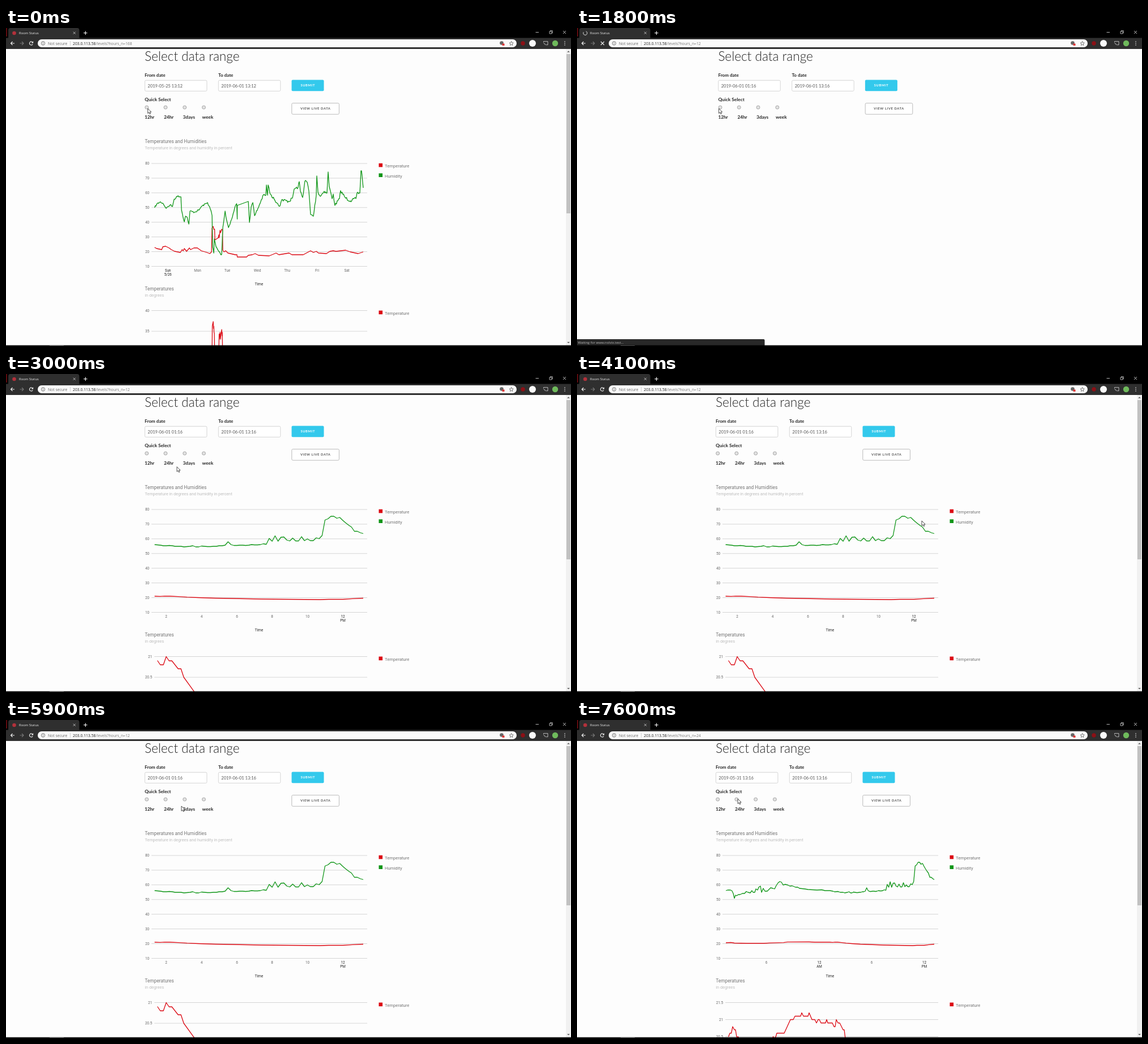
Animation of 998x561 px, one loop 8000 ms. Source, as an HTML page with a canvas:

```html
<!DOCTYPE html>
<html lang="en">
<head>
<meta charset="utf-8">
<title>Room Status</title>
<style>
html, body { margin: 0; width: 100%; height: 100%; overflow: hidden; background: #fdfdfd; }
canvas { display: block; }
</style>
</head>
<body>
<canvas id="stage" width="998" height="561"></canvas>
<script>
const ctx = document.getElementById('stage').getContext('2d');
const LOOP = 8000, RED = '#dc0a14', GREEN = '#109618';
const HOST = '203.0.113.58', PATH = '/levels?hours_n=';
const UI = '"Open Sans", sans-serif', FORM = 'Lato, sans-serif', CHART = 'Roboto, sans-serif';

// ---- drawing helpers ----
function text(str, x, y, size, color, family = CHART, weight = 400, align = 'left', spacing = 0) {
  ctx.font = `${weight} ${size}px ${family}`;
  ctx.fillStyle = color;
  ctx.textAlign = align;
  ctx.letterSpacing = spacing + 'px';
  ctx.fillText(str, x, y);
}
function rect(x, y, w, h, color) {
  ctx.fillStyle = color;
  ctx.fillRect(x, y, w, h);
}
function box(x, y, w, h, r, fill, border) {
  ctx.beginPath();
  ctx.roundRect(x, y, w, h, r);
  if (fill) { ctx.fillStyle = fill; ctx.fill(); }
  if (border) { ctx.strokeStyle = border; ctx.lineWidth = 0.8; ctx.stroke(); }
}
function disc(x, y, r, fill) {
  ctx.beginPath();
  ctx.arc(x, y, r, 0, 7);
  ctx.fillStyle = fill;
  ctx.fill();
}
function arc(x, y, r, from, to, color, width = 1) {
  ctx.beginPath();
  ctx.arc(x, y, r, from, to);
  ctx.strokeStyle = color;
  ctx.lineWidth = width;
  ctx.stroke();
}
function path(d, color, width = 1, fill) {
  const p = new Path2D(d);
  if (fill) { ctx.fillStyle = fill; ctx.fill(p); }
  ctx.strokeStyle = color;
  ctx.lineWidth = width;
  ctx.stroke(p);
}
function polyline(points, color) {
  ctx.beginPath();
  points.forEach(([x, y]) => ctx.lineTo(x, y));
  ctx.strokeStyle = color;
  ctx.lineWidth = 1.3;
  ctx.lineJoin = 'round';
  ctx.stroke();
}

// ---- chart data, in stage coordinates ----
const pairs = str => str.split(' ').map(p => p.split(',').map(Number));
function roughen(points, amount) {
  let seed = 7;
  const random = () => (seed = seed * 16807 % 2147483647) / 2147483647 - 0.5;
  return points.flatMap(([x, y], i) => {
    if (!i) return [[x, y]];
    const [px, py] = points[i - 1], n = Math.max(1, Math.round((x - px) / 1.3)), out = [];
    for (let k = 1; k < n; k++) out.push([px + (x - px) * k / n, py + (y - py) * k / n + random() * amount]);
    return [...out, [x, y]];
  });
}
const lastHalf = points => points.map(([x, y]) => [446.8 + (x - 262.5) / 2, y]);

const humidity12 = [301, 301.5, 302, 303, 303, 302.5, 303, 304, 304, 304, 305, 304.5, 304, 303, 305, 305, 303.5, 304,
  304.5, 304.5, 304, 304, 303, 303, 302, 296, 301, 302.5, 302.5, 302, 302, 302.5, 302, 301, 301.5, 301.5, 301, 299.5,
  300.5, 290, 295, 285.5, 295, 288, 287.5, 293, 294.5, 289.5, 294.5, 294.5, 287, 294, 291, 294, 294, 289, 290.5, 285,
  257.5, 255.5, 251, 251, 254.5, 253, 258, 262.5, 266.5, 270, 277.5, 277.5, 280, 281.5
].map((y, i) => [262.5 + i * 5.19, y]);
const temperature12 = pairs('262.5,392 272,392.4 280,391.9 290,392 304,392.7 320,393.7 340,394.5 370,395.5 400,396 450,397 500,397.5 555,398 570,397.5 595,397.5 612,396.3 631,395.5');

const charts = {
  168: {
    days: [[286, 'Sun', '5/26'], [338.5, 'Mon'], [391, 'Tue'], [444, 'Wed'], [496.5, 'Thu'], [549.5, 'Fri'], [602, 'Sat']],
    humidity: roughen(pairs('262.5,317 266,311 272,307 277,309 283,318 290,312 294,315 297,302 304,296 309,298 310,321 315,342 317,332 320,334 323,346 325,323 333,325 341,321 345,315 356,308 362,322 364,331 365,386 367,397 368,372 371,386 376,394 379,399 381,399 383,352 387,323 389,336 393,352 400,333 405,314 407.5,310 408.5,337'), 3)
      .concat([[408.5, 313], [425, 307]],
        roughen(pairs('428,306 430,343 433,316 436,308 439,331 445,318 451,303 455,294 459,295 460,277 462,295 463,277 466,291 475,304 484,314 487,303 500,306 506,300 509,284 516,281 518,271 520,288 524,299 528,270 532,272 535,288 538,329 543,332 548,295 549,261 551,289 555,297 562,288 567,291 569,254 571,280 576,301 578,293 581,313 589,301 591,287 599,299 608,305 618,301 620,291 625,291 627,252 628,252 630,272 631,282'), 5)),
    temperature: pairs('262.5,387 266,389 275,391 277,386 282,385 288,388 292,391 298,394 308,396 311,391 313,393 315,389 319,394 324,388 326,391 332,388 338,388 345,393 355,396 360,398 363,395 364,353 366,350 367,355 368.5,355 369,374 375,370 376,365 376.5,370 377.5,362 378,357 379,361 381,355 382.5,357 383,392 385,395 388,393 392,397 405,400 408,400 408.5,404 425,404 428,401 435,400 440,398 446,401 465,402 477,397 482,400 500,397 505,400 525,400 538,393 543,396 548,394 552,397 566,398 572,394 578,393 583,394 600,392 608,395 622,398 631,395'),
    labels: ['40', '35'], step: 36.4, labelX: 253,
    detail: [pairs('364,565 364.5,525 366,518 366.5,530 367,526 367.5,537 368,539 368.5,565'),
      pairs('376,565 376.5,540 377,549 378,537 379,549 379.5,541 381,532 381.5,543 382,537 382.5,565')]
  },
  12: {
    days: [[283, '2'], [345.5, '4'], [408, '6'], [470, '8'], [532.5, '10'], [595, '12', 'PM']],
    humidity: humidity12,
    temperature: temperature12,
    labels: ['21', '20.5'], step: 36.4, labelX: 258,
    detail: [pairs('267.5,505.5 272.5,513 278,513 283,498.5 288,506 293,506 304,520 309,520 314,535 335,564')]
  },
  24: {
    days: [[334.5, '6'], [428, '12', 'AM'], [520.5, '6'], [613.5, '12', 'PM']],
    humidity: pairs('263,301 266,300 271,300 273.5,301 276,306 278,314.5 280,309 282,310 285,308 288,308 292,306 296,306 299,302.5 302,304 306,305 309,301 311,304 314,304 316,298 319,300 321,295 324,293 326,304 329,297 332,302 336,302 339,299 342,296 346,297 349,298 352,292 355,287.5 358,285 361,286 364,291 368,290 372,291 376,293 380,292.5 386,295 390,295 393,297 402,298 408,299 424,300 432,299.5 438,301').concat(lastHalf(humidity12)),
    temperature: pairs('263,393 272,392.5 278,393.5 300,394 330,394 340,393.3 365,392.7 372,391.7 410,391.5 420,392').concat(lastHalf(temperature12)),
    labels: ['21.5', '21', '20.5'], step: 30, labelX: 258,
    detail: [pairs('267.5,559 270,552.5 272.5,552.5 275,541 278,546.5 280,546.5 282,559 285,559 287,566'),
      pairs('345,565 346.5,558.5 348,562 351,559 353,552.5 366,552.5 377,528.5 382,528.5 385,522.5 395,522.5 397,516.5 400,522.5 408,522.5 410,516.5 415,528.5 420,528.5 423,534.5 426,528.5 428,528.5 431,534.5 439,534.5 441,528.5 443,534.5 451,534.5 454,541 456,541 458,528.5 461,534.5 464,534.5 470,546.5 472,546.5 474,562')]
  }
};
const fromDates = { 168: '2019-05-25 13:12', 12: '2019-06-01 01:16', 24: '2019-05-31 13:16' };

// ---- page ----
function drawForm(dx, range, checked) {
  ctx.save();
  ctx.translate(dx, 0);
  const ink = '#222';
  text('Select data range', 245, 58, 22.6, ink, FORM, 300);
  [['From date', 245, fromDates[range]], ['To date', 375, range === 168 ? '2019-06-01 13:12' : '2019-06-01 13:16']]
    .forEach(([label, x, value]) => {
      text(label, x, 86, 8.1, ink, FORM, 700);
      box(x + 0.3, 92.3, 109.5, 19, 2, '#fff', '#ccc');
      text(value, x + 5.3, 104.6, 7.5, '#555', FORM);
    });
  text('Quick Select', 245, 128.6, 8.3, ink, FORM, 700);
  [['12hr', 245, 248.6], ['24hr', 279, 281.8], ['3days', 312.5, 315.6], ['week', 346.5, 349.4]].forEach(([label, x, cx], i) => {
    disc(cx, 140, 3, '#e2e2e2');
    arc(cx, 140, 3, 0, 7, '#999', 0.8);
    if (checked === i) disc(cx, 140, 1.6, '#444');
    text(label, x, 160, 8.2, ink, FORM, 700);
  });
  box(504.5, 91.6, 57, 19.6, 2, '#33c9ec');
  text('SUBMIT', 533.2, 103.4, 5.8, '#fff', FORM, 700, 'center', 0.6);
  box(504.8, 132.6, 83.6, 19.6, 2, '#fff', '#aaa');
  text('VIEW LIVE DATA', 546.7, 144.4, 5.8, '#555', FORM, 700, 'center', 0.6);
  ctx.restore();
}

function legend(label, y, color) {
  rect(658.5, y, 6.6, 6.6, color);
  text(label, 669, y + 7.4, 7.7, '#757575');
}

function gridRow(label, x, y) {
  rect(x + 4, y - 0.4, 638 - x - 4, 0.8, '#ccc');
  text(label, x, y + 2.3, 6.3, '#666', CHART, 400, 'right');
}

function drawCharts(chart) {
  text('Temperatures and Humidities', 245.3, 203, 8.3, '#757575');
  text('Temperature in degrees and humidity in percent', 245.3, 214, 7.3, '#bdbdbd');
  for (let i = 0; i < 8; i++) gridRow(80 - i * 10, 253, 239 + i * 25.93);
  chart.days.forEach(([x, ...lines]) => lines.forEach((line, i) =>
    text(line, x, 430 + i * 7, 6.3, lines.length > 1 ? '#222' : '#666', CHART, 400, 'center')));
  text('Time', 446.8, 453.6, 6.5, '#222', CHART, 400, 'center');
  polyline(chart.temperature, RED);
  polyline(chart.humidity, GREEN);
  legend('Temperature', 238.7, RED);
  legend('Humidity', 256.4, GREEN);

  text('Temperatures', 245.3, 463, 8.3, '#757575');
  text('in degrees', 245.3, 474, 7.3, '#bdbdbd');
  chart.labels.forEach((label, i) => gridRow(label, chart.labelX, 498.6 + i * chart.step));
  chart.detail.forEach(points => polyline(points, RED));
  legend('Temperature', 498.5, RED);
}

function drawScrollbar() {
  rect(989, 37, 9, 523, '#f1f1f1');
  rect(990, 46, 7, 281, '#c1c1c1');
  path('M991.5 42.5l2-2 2 2z', '#555', 0.3, '#555');
  path('M991.5 554l2 2 2-2z', '#555', 0.3, '#555');
}

// ---- browser frame ----
function drawBrowser(t, range, loading, waiting) {
  rect(0, 0, 998, 18, '#000');
  rect(0, 0, 2, 15, '#5c0a0e');
  box(4, 0, 125.5, 20, [4, 4, 0, 0], '#2f2f2f');
  rect(0, 17.5, 998, 19.5, '#2f2f2f');
  if (loading) {
    const start = waiting ? -1.8 + (t - 7000) / 160 : -1.2 + (t - 1800) / 130;
    arc(14.5, 9, 3.5, start, start + (waiting ? 0.9 : 4.9), '#ddd');
  } else disc(14.5, 9, 3.3, '#b3313b');
  text(waiting ? HOST + PATH + range : 'Room Status', 23, 11, 5.9, '#eee', UI);
  path('M118.7 6.7l4 4m0-4l-4 4', '#ccc', 0.9);
  path('M137 8.7h6.6m-3.3-3.3v6.6', '#fff', 1.1);
  path('M935.5 7.7h5.5M984 5l5 5m0-5l-5 5', '#eee', 0.8);
  path('M960 6h4v4h-4zM961.3 6v-1.3h4v4h-1.3', '#eee', 0.7);

  path('M15 27H8.5m3-3l-3 3 3 3', '#eee', 1.1);
  path('M24.5 27H31m-3-3l3 3-3 3', '#777', 1.1);
  if (loading) path('M42 24l6 6m0-6l-6 6', '#eee', 1.1);
  else {
    arc(44.6, 27, 3, 0.5, 5.5, '#eee', 1.1);
    path('M48 23.6v3h-3z', '#eee', 0.3, '#eee');
  }
  box(56, 20, 846, 14, 7, '#fafafa');
  arc(65.5, 27, 3.2, 0, 7, '#555', 0.8);
  path('M65.5 26.4v2.3m0-3.9v.9', '#555', 0.8);
  text('Not secure', 74, 29.5, 6.8, '#666', UI);
  rect(113, 23, 0.6, 8, '#bbb');
  text(HOST, 118, 29.5, 6.8, '#222', UI);
  const hostWidth = ctx.measureText(HOST).width;
  text(PATH + range, 118 + hostWidth, 29.5, 6.8, '#777', UI);
  disc(875.5, 26.5, 3.3, '#666');
  rect(876.5, 27.5, 4, 3.5, '#d33');
  path('M892.7 23.5l1.1 2.4 2.5.3-1.9 1.7.5 2.6-2.2-1.3-2.2 1.3.5-2.6-1.9-1.7 2.5-.3z', '#444', 0.7);
  disc(913, 27, 3.7, '#8c1016');
  disc(930, 27, 6, '#fafafa');
  path('M949.5 25.5v-1.8h7.5v6h-3.5M949.5 27a3 3 0 0 1 3 3', '#ddd', 0.8);
  disc(970, 27, 5.2, '#6fba5c');
  [24, 27, 30].forEach(y => disc(987, y, 0.8, '#eee'));
}

function drawStatus(alpha) {
  ctx.globalAlpha = alpha;
  box(0, 549, 331.5, 12, [0, 2, 0, 0], '#282828');
  text('Waiting for www.nolvix.test...', 1.5, 557, 6, '#bbb', UI);
  ctx.globalAlpha = 1;
}

// ---- pointer ----
const route = pairs('2700,250.5,142 2800,258,144 3000,301.5,163.5 3300,430,207 3600,575,250 3800,612,262 4200,608,258 4600,588,253 4900,537,248.5 5300,500,238 5600,420,205 5900,310,152 6100,284,139');
function pointerAt(t) {
  const next = route.findIndex(p => p[0] > t);
  if (next < 1) return (next ? route[route.length - 1] : route[0]).slice(1);
  const [t0, x0, y0] = route[next - 1], [t1, x1, y1] = route[next], k = (t - t0) / (t1 - t0);
  return [x0 + (x1 - x0) * k, y0 + (y1 - y0) * k];
}
function drawPointer(t) {
  ctx.save();
  ctx.translate(...pointerAt(t));
  path('M0 0v8.6l2-1.8 1.4 3 1.5-.7-1.4-2.9h2.6z', '#222', 0.8, '#fff');
  ctx.restore();
}

// ---- timeline ----
function draw(t) {
  const within = (a, b) => t >= a && t < b;
  const urlRange = t < 1100 ? 168 : t < 6800 ? 12 : 24;
  const pageRange = t < 1600 ? 168 : t < 7200 ? 12 : 24;
  const waiting = within(1100, 1600) || within(6800, 7200);
  const loading = within(1100, 2000) || within(6800, 7400);
  const bare = within(1600, 1900) || within(7200, 7400);
  const chartsHidden = within(1600, 2300) || within(7200, 7500);

  rect(0, 0, 998, 561, '#fdfdfd');
  drawForm(bare ? 4.4 : 0, pageRange, waiting ? (t < 2000 ? 0 : 1) : -1);
  if (!chartsHidden) drawCharts(charts[pageRange]);
  if (!bare) drawScrollbar();
  if (within(1600, 2600)) drawStatus(t < 2300 ? 1 : 0.85 * (2600 - t) / 300);
  drawBrowser(t, urlRange, loading, waiting);
  rect(0, 559.7, 998, 1.3, '#000');
  rect(77, 560, 25, 1, '#444');
  drawPointer(t);
}

function tick() {
  draw(performance.now() % LOOP);
  requestAnimationFrame(tick);
}
tick();
</script>
</body>
</html>
```
